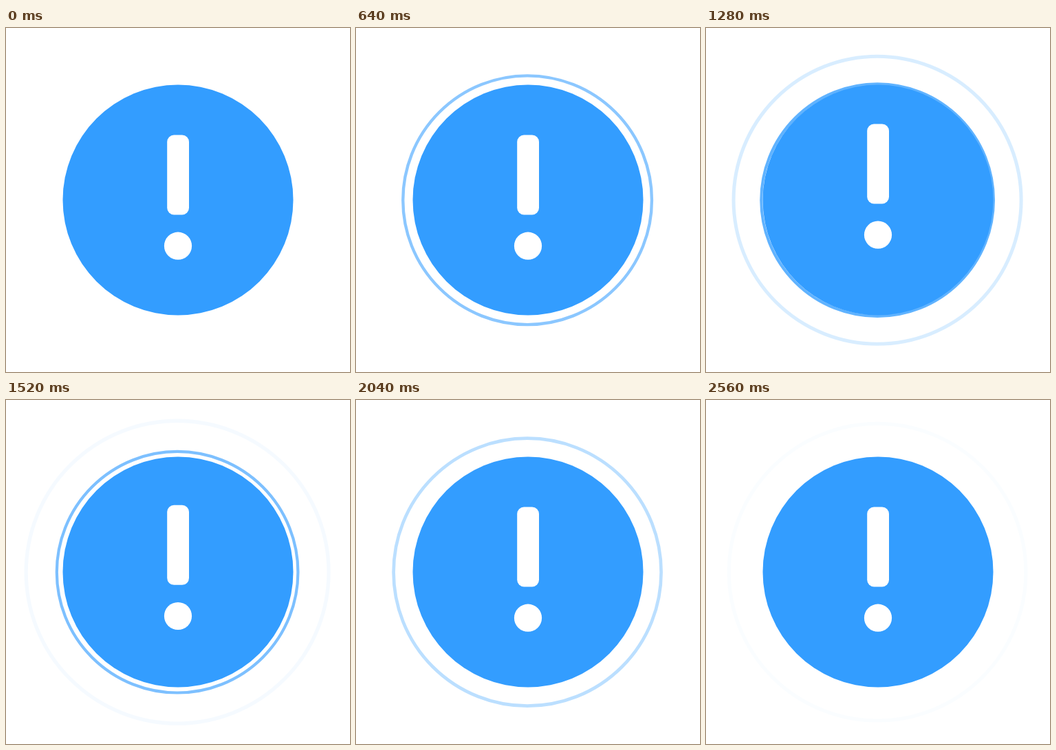
These frames come from a looping animation (500 px wide and 500 px high, 2.6 s). An HTML page:

```html
<!DOCTYPE html>
<html lang="en">
<head>
<meta charset="utf-8">
<title>Alert pulse</title>
<style>
  html, body { margin: 0; width: 100%; height: 100%; overflow: hidden; background: #fff; }
  svg { display: block; width: 100vw; height: 100vh; }
</style>
</head>
<body>
<svg viewBox="0 0 500 500">
  <g fill="none" stroke="#339dff">
    <circle class="ring" cx="249.1" cy="250.2"/>
    <circle class="ring" cx="249.1" cy="250.2"/>
  </g>
  <circle cx="250" cy="250" r="167.5" fill="#339dff"/>
  <g id="mark" fill="#fff">
    <rect x="234.2" y="155.5" width="31.8" height="116" rx="10"/>
    <circle cx="250" cy="316.7" r="20.1"/>
  </g>
</svg>
<script>
const LOOP = 2600, STEP = 40, RING_TIME = 1600, START_RADIUS = 166.8;
const BOUNCE = { start: 1000, length: 600, height: 16.2 };
const rings = [
  { start: 0, growth: 59 },
  { start: 1000, growth: 53 },
];
const ringNodes = document.querySelectorAll('.ring');
const mark = document.getElementById('mark');

const bezier = (a, b, u) => 3 * a * u * (1 - u) ** 2 + 3 * b * u * u * (1 - u) + u ** 3;

// Slow start, then nearly constant speed.
function ease(p) {
  let low = 0, high = 1;
  for (let i = 0; i < 24; i++) {
    const mid = (low + high) / 2;
    if (bezier(0.333, 0.8, mid) < p) low = mid; else high = mid;
  }
  return bezier(0.05, 0.8, low);
}

function drawRing(node, { start, growth }, t) {
  const p = (t - start) / RING_TIME;
  const visible = p > 0 && p < 1;
  node.setAttribute('opacity', visible ? 0.94 * (1 - p) : 0);
  if (!visible) return;
  const outer = START_RADIUS + growth * ease(p);
  const width = outer * 0.0238;
  node.setAttribute('r', outer - width / 2);
  node.setAttribute('stroke-width', width);
}

function draw(now) {
  const t = Math.floor((now % LOOP) / STEP) * STEP;
  rings.forEach((ring, i) => drawRing(ringNodes[i], ring, t));
  const p = Math.min(1, Math.max(0, (t - BOUNCE.start) / BOUNCE.length));
  const lift = BOUNCE.height * (1 - Math.cos(2 * Math.PI * p)) / 2;
  mark.setAttribute('transform', `translate(0 ${-lift})`);
}

const origin = performance.now();
function tick() {
  draw(performance.now() - origin);
  requestAnimationFrame(tick);
}
tick();
</script>
</body>
</html>
```
